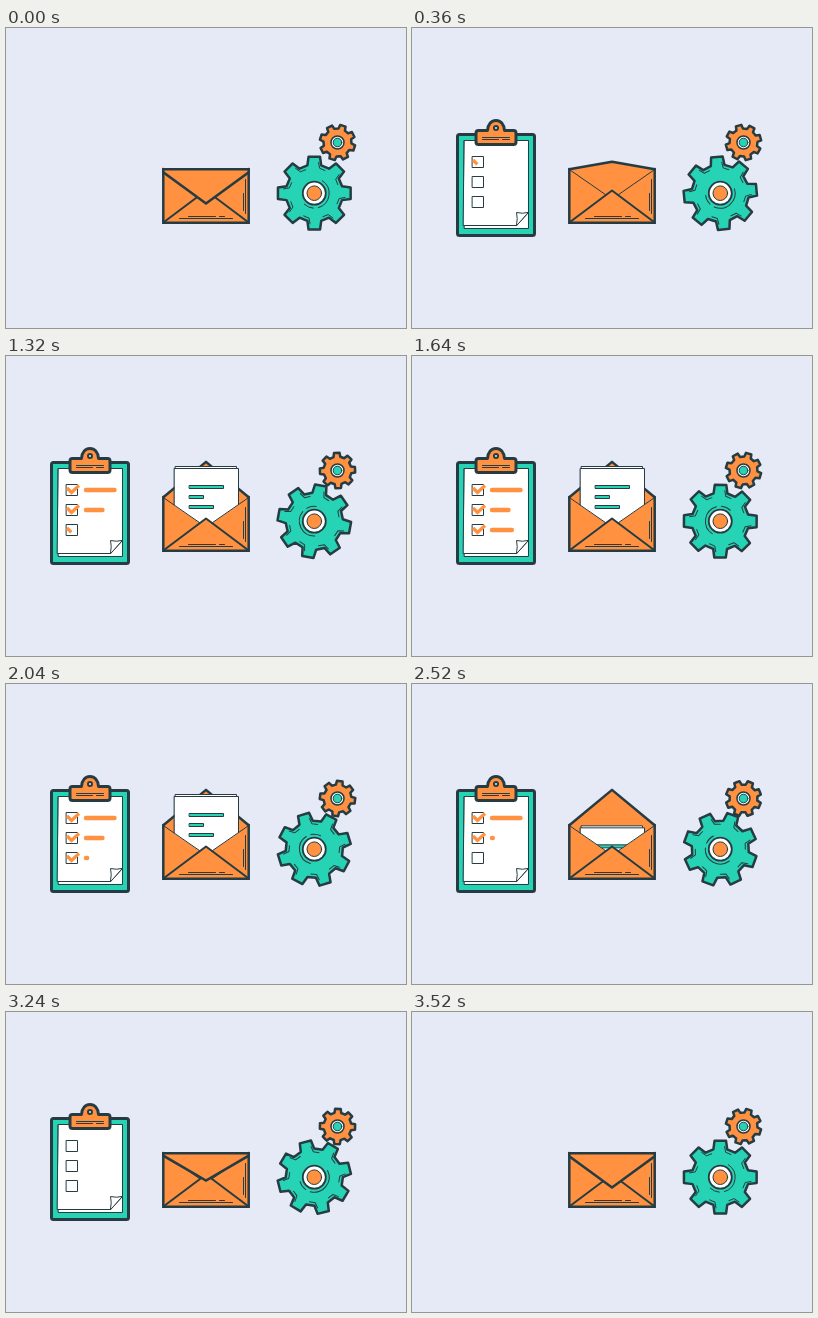
Animation, 400 px wide and 300 px high, one loop 3.6 s. Source, as an HTML page:

```html
<!DOCTYPE html>
<html lang="en">
<head>
<meta charset="utf-8">
<title>Workflow icons</title>
<style>
  html, body { margin: 0; width: 100%; height: 100%; overflow: hidden; background: #e5eaf6; }
  svg { display: block; width: 400px; height: 300px; }
  .ink { stroke: #263c42; stroke-linejoin: round; stroke-linecap: round; }
  .w3 { stroke-width: 3; }
  .w25 { stroke-width: 2.5; }
  .w2 { stroke-width: 2; }
  .w1 { stroke-width: 1; }
  .miter { stroke-linejoin: miter; }
  .orange { fill: #ff9140; }
  .green { fill: #27d3b5; }
  .white { fill: #fff; }
  .none { fill: none; }
  .mark { fill: none; stroke: #ff9140; stroke-width: 3.2; }
  .bar { fill: none; stroke: #ff9140; stroke-width: 4.4; stroke-linecap: round; }
</style>
</head>
<body>
<svg viewBox="0 0 400 300">
  <defs>
    <clipPath id="mouth"><path d="M156 90H244V141L206.2 166.8L200 162L193.8 166.8L156 141Z"/></clipPath>
  </defs>

  <g id="board">
    <rect class="ink w3 green" x="45.5" y="106.5" width="77" height="101" rx="2"/>
  </g>
  <g id="paper">
    <path class="ink w1 white" d="M52.5 112.5H116.5V200.5H52.5Z"/>
    <path class="ink w1 white" d="M52.5 112.5H116.5V184.5L104.5 197.5H51.5Z"/>
    <path class="ink w1 white" d="M104.5 197.5Q106 190 104.500 184.500Q110 186 116 184.500Z"/>
    <g id="boxes" class="ink w1 none"></g>
  </g>
  <g id="marks"></g>
  <g id="clip">
    <path class="ink w3 orange" d="M66.500 102.500H75.500C76 96 79.500 92.500 84 92.500S92 96 92.500 102.500H101.500Q104 102.500 104 105V114Q104 116.500 101.500 116.500H66.500Q64 116.500 64 114V105Q64 102.500 66.500 102.500Z"/>
    <circle class="ink w2" cx="84" cy="100" r="2" fill="#e5eaf6"/>
    <path class="ink w1 none" d="M70.500 109.500H97.500M70.500 111.500H86.500M90.500 111.500H97.500"/>
  </g>

  <g id="mail">
    <path class="orange" d="M157.500 141H242.500V194.500H157.500Z"/>
    <path id="flapBack" class="ink w25 orange"/>
    <g clip-path="url(#mouth)">
      <g id="letter" class="ink w1">
        <path class="white" d="M169.500 110.500H230.500V180H169.500Z"/>
        <path class="white" d="M168.500 112.500H232.500V190H168.500Z"/>
        <path class="green" d="M183.500 129.500H217.500V132.500H183.500ZM183.500 139.500H197.500V142.500H183.500ZM183.500 149.500H207.500V152.500H183.500Z"/>
      </g>
    </g>
    <path class="ink w1 none" d="M158 142L193.800 166.800M242 142L206.200 166.800"/>
    <path class="ink w2 none" d="M158 194L200 162.500L242 194"/>
    <path class="ink w25 none miter" d="M157.300 141V194.800H242.700V141"/>
    <path class="ink w1 none" d="M239.500 151.500V185.500M237.500 165.500V182.500M182.500 188.500H209.500M213.500 188.500H218.500M173.500 190.500H226.500"/>
    <path id="flapFront" class="ink w25 orange miter"/>
  </g>

  <g transform="translate(331.500 114.500)">
    <g id="small">
      <path id="smallRim" class="ink w25 orange"/>
    </g>
    <circle class="ink white" r="6.500" stroke-width="1.500"/>
    <circle class="ink w1 green" r="4.300"/>
  </g>
  <g transform="translate(308.300 165.200)">
    <g id="big">
      <path id="bigRim" class="ink w25 green"/>
      <path id="hatch" class="ink w1 none"/>
      <path class="ink w1 none" d="M8 -12.500A15 15 0 0 1 4 14.500M-1 15A15 15 0 0 1 -10 11"/>
    </g>
    <circle class="ink white" r="11.500" stroke-width="1.800"/>
    <circle class="ink w1 orange" r="7.300"/>
  </g>
</svg>
<script>
const STEP = 40, LOOP = 3600, END = 3520;
const MAIL_END = 3300, SPIN = 0.11;
const $ = id => document.getElementById(id);
const ramp = (t, from, to) => Math.min(1, Math.max(0, (t - from) / (to - from)));
const smooth = p => p * p * (3 - 2 * p);
const polar = (r, deg) => {
  const a = (deg - 90) * Math.PI / 180;
  return (r * Math.cos(a)).toFixed(2) + ' ' + (r * Math.sin(a)).toFixed(2);
};

function gearPath(outer, root, tip, base) {
  const pts = [];
  for (let a = 0; a < 360; a += 45)
    pts.push(polar(root, a - base), polar(outer, a - tip), polar(outer, a + tip), polar(root, a + base));
  return 'M' + pts.join('L') + 'Z';
}

function hatchPath() {
  let d = '';
  for (let a = 0; a < 360; a += 45)
    d += `M${polar(31, a + 8)}L${polar(25.5, a + 12)}L${polar(25, a + 25)}`;
  return d;
}

$('bigRim').setAttribute('d', gearPath(36.8, 28.6, 9, 14));
$('smallRim').setAttribute('d', gearPath(17.8, 14, 9, 14));
$('hatch').setAttribute('d', hatchPath());

const rows = [
  { y: 134, end: 108.5, start: 290 },
  { y: 154, end: 96.5, start: 770 },
  { y: 174, end: 104, start: 1250 }
];

function add(parent, cls, d) {
  const p = document.createElementNS('http://www.w3.org/2000/svg', 'path');
  p.setAttribute('class', cls);
  p.setAttribute('d', d);
  $(parent).append(p);
  return p;
}

for (const r of rows) {
  add('boxes', '', `M60.500 ${r.y - 5.5}h11v11h-11z`);
  r.check = add('marks', 'mark', `M61 ${r.y - 2}L65.500 ${r.y + 2.5}L73 ${r.y - 4.5}`);
  r.bar = add('marks', 'bar', `M80 ${r.y}H${r.end}`);
  r.check.setAttribute('pathLength', 1);
  r.bar.setAttribute('pathLength', 1);
}

function reveal(path, p) {
  path.style.display = p > 0 ? '' : 'none';
  path.style.strokeDasharray = `${p} 2`;
}

function pop(id, s, x, y) {
  $(id).style.display = s > 0 ? '' : 'none';
  $(id).setAttribute('transform', `translate(${x} ${y}) scale(${s}) translate(${-x} ${-y})`);
}

// s runs from 1 (closed, in front) to -1 (open, behind the letter).
function flap(s) {
  const side = 141.3 + 3 * Math.max(0, s);
  const d = `M157.300 141.300V${side}L200 ${140.7 + 34.8 * s}L242.700 ${side}V141.300`;
  $('flapFront').setAttribute('d', s >= 0 ? d + 'Z' : '');
  $('flapBack').setAttribute('d', s < 0 ? d : '');
}

function draw(t) {
  // Every part plays out, then runs backwards.
  const c = Math.min(t, END - t);
  pop('board', smooth(ramp(c, 0, 160)), 84, 157);
  pop('paper', smooth(ramp(c, 140, 260)), 84, 156);
  pop('clip', smooth(ramp(c, 140, 260)), 84, 105);
  for (const r of rows) {
    reveal(r.check, ramp(c, r.start, r.start + 190));
    reveal(r.bar, smooth(ramp(c, r.start + 195, r.start + 460)));
  }
  $('big').setAttribute('transform', `rotate(${SPIN * c})`);
  $('small').setAttribute('transform', `rotate(${18 - 2 * SPIN * c})`);

  const m = Math.min(t, MAIL_END - t);
  flap(1 - 2 * ramp(m, 0, 600));
  $('letter').setAttribute('transform', `translate(0 ${57 * (1 - ramp(m, 600, 1000))})`);
}

function frame() {
  const t = performance.now() % LOOP;
  draw(Math.min(END, Math.floor(t / STEP) * STEP));
  requestAnimationFrame(frame);
}
frame();
</script>
</body>
</html>
```
